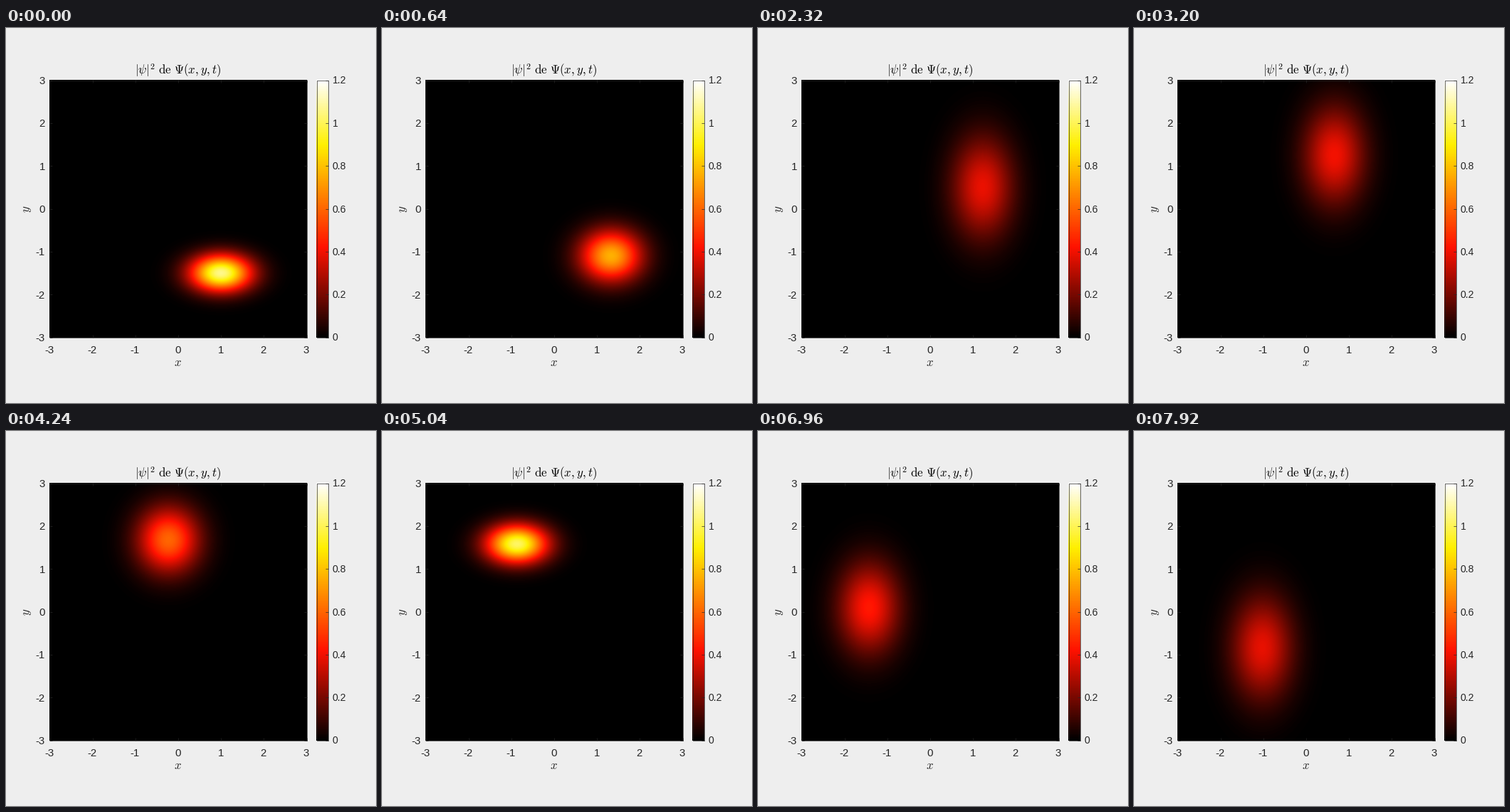
A matplotlib script that plays this animation: 520x528 px, repeating every 8 s.

```python
import numpy as np
import matplotlib.pyplot as plt
from matplotlib.animation import FuncAnimation
from matplotlib.colors import LinearSegmentedColormap

W, H, DPI = 520, 528, 100
FRAMES, INTERVAL = 100, 80
LEFT, RIGHT, TOP, BOTTOM = 61, 423, 73, 436
BAR_LEFT, BAR_RIGHT = 436, 453
INK = "#262626"
VMAX = 1.2
OMEGA = 2.0          # trap frequency, hbar = m = 1
DT = 0.024           # simulated time per frame
SIGMA_X, SIGMA_Y = 0.5, 0.3

plt.rcParams["mathtext.fontset"] = "cm"
HOT = LinearSegmentedColormap.from_list(
    "heat", [(0, "black"), (0.35, "#ff1200"), (0.75, "#fff000"), (1, "white")],
    N=256)

fig = plt.figure(figsize=(W / DPI, H / DPI), dpi=DPI, facecolor="#eeeeee")
ax = fig.add_axes([0, 0, 1, 1])
ax.axis("off")


def px(points):
    return points * 72 / DPI


def label(x, y, text, size, ha="center", va="baseline", **kw):
    ax.text(x, y, text, fontsize=px(size), ha=ha, va=va,
            family="Liberation Sans", **kw)


def line(xs, ys, alpha=1):
    ax.plot(xs, ys, color=INK, alpha=alpha, lw=px(1), solid_capstyle="butt")


def frame_box(x0, x1, alpha=1):
    x0, x1, y0, y1 = x0 + 0.5, x1 - 0.5, TOP + 0.5, BOTTOM - 0.5
    line([x0, x1, x1, x0, x0], [y0, y0, y1, y1, y0], alpha)


def width(sigma, phase):
    """Breathing width of a Gaussian packet in a harmonic trap."""
    return np.hypot(sigma * np.cos(phase),
                    np.sin(phase) / (2 * OMEGA * sigma))


def gauss(u, center, sigma):
    return (np.exp(-0.5 * ((u - center) / sigma) ** 2)
            / (sigma * np.sqrt(2 * np.pi)))


grid_x = np.linspace(-3, 3, RIGHT - LEFT)
grid_y = np.linspace(3, -3, BOTTOM - TOP)


def density(frame):
    phase = OMEGA * DT * frame
    c, s = np.cos(phase), np.sin(phase)
    along_x = gauss(grid_x, c + 1.065 * s, width(SIGMA_X, phase))
    along_y = gauss(grid_y, -1.5 * c + 0.782 * s, width(SIGMA_Y, phase))
    return np.outer(along_y, along_x)


def heat(data, x0, x1):
    return ax.imshow(data, cmap=HOT, vmin=0, vmax=VMAX, aspect="auto",
                     interpolation="nearest", extent=(x0, x1, BOTTOM, TOP))


packet = heat(density(0), LEFT, RIGHT)
heat(np.linspace(VMAX, 0, BOTTOM - TOP)[:, None], BAR_LEFT, BAR_RIGHT)
ax.set_xlim(0, W)
ax.set_ylim(H, 0)

frame_box(LEFT, RIGHT, 0.7)
frame_box(BAR_LEFT, BAR_RIGHT, 0.7)

for v in range(-3, 4):
    x = LEFT + 0.5 + (v + 3) / 6 * (RIGHT - LEFT - 1)
    y = BOTTOM - 0.5 - (v + 3) / 6 * (BOTTOM - TOP - 1)
    for start, step in ((TOP, 4), (BOTTOM, -4)):
        line([x, x], [start, start + step], 0.7)
    for start, step in ((LEFT, 4), (RIGHT, -4)):
        line([start, start + step], [y, y], 0.7)
    label(x - 0.5, 457.5, str(v), 15, color=INK)
    label(55, y + 5.5, str(v), 15, ha="right", color=INK)

for i in range(7):
    y = BOTTOM - 0.5 - i / 6 * (BOTTOM - TOP - 1)
    line([BAR_RIGHT - 4, BAR_RIGHT], [y, y], 0.7)
    label(458.5, y + 5, f"{i / 5:g}", 14, ha="left", color=INK)

label(241.3, 65.5, r"$|\psi|^2\ \mathrm{de}\ \Psi(x,y,t)$", 17, color="black")
label(241.5, 476, "$x$", 17, color=INK)
label(30.5, 254.5, "$y$", 17, va="center", rotation=90, color=INK)


def update(frame):
    packet.set_data(density(frame))
    return (packet,)


anim = FuncAnimation(fig, update, frames=FRAMES, interval=INTERVAL,
                     repeat=True, repeat_delay=0, blit=False)
plt.show()
```
